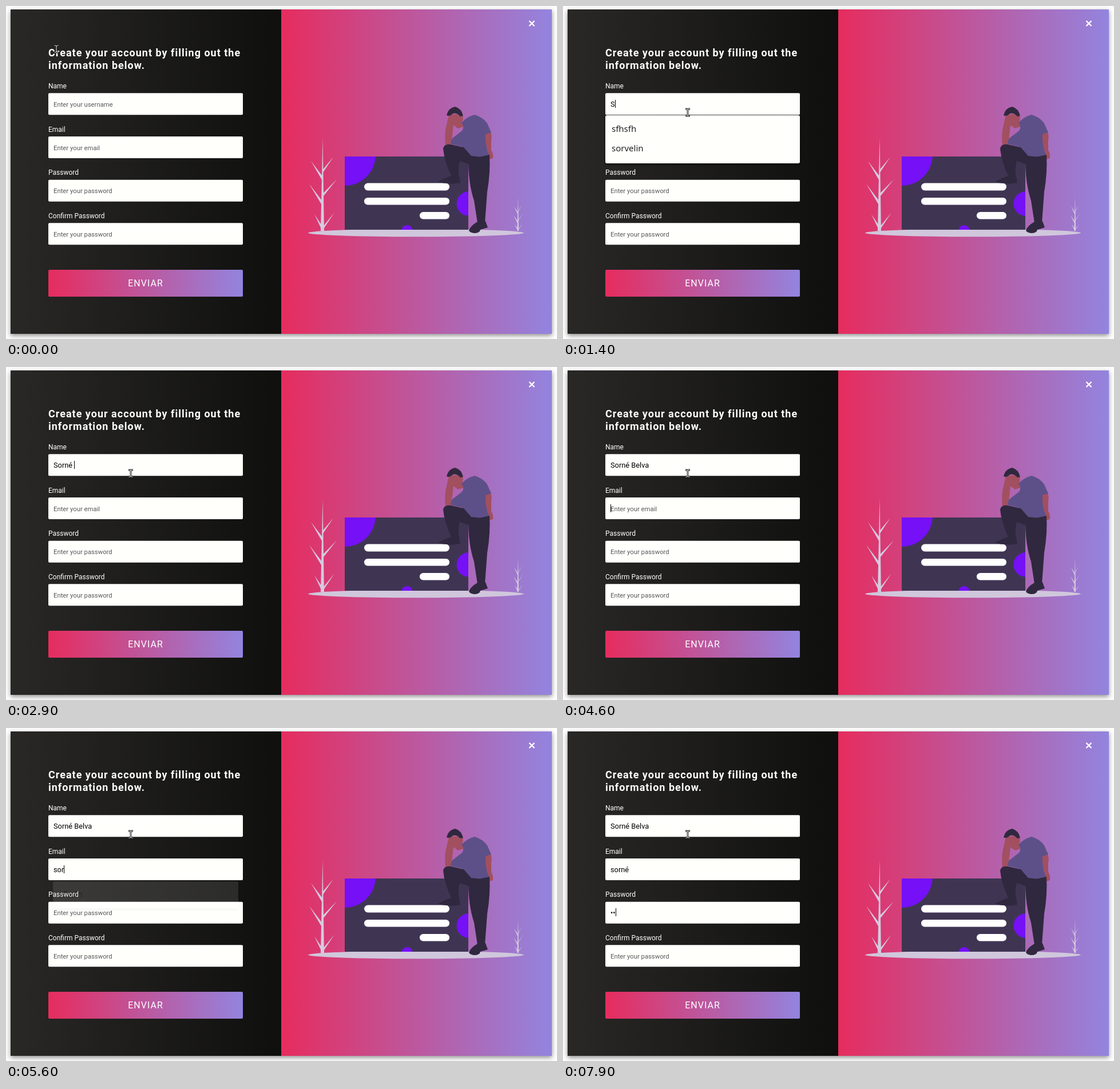
Recreate the animation shown at these times as an HTML page with a canvas. Size 963 px wide and 582 px high, loop 8000 ms.

```html
<!DOCTYPE html>
<html lang="en">
<head>
<meta charset="utf-8">
<title>Sign up</title>
<style>
  html, body { margin: 0; width: 963px; height: 582px; overflow: hidden; background: #fefefe; }
  canvas, .text, .popup, .cursor { position: absolute; }
  canvas { left: 0; top: 0; }
  .text { height: 20px; line-height: 20px; white-space: pre; font: 12px/20px Roboto, sans-serif; color: #fff; }
  .title { font-weight: 700; font-size: 18px; letter-spacing: 1px; }
  .button { font-size: 16px; letter-spacing: 1px; width: 340px; text-align: center; }
  .field { font-size: 12.8px; color: #000; }
  .field i { display: inline-block; width: 1px; height: 14px; margin-right: -1px; background: #000; vertical-align: -2px; }
  .field span { font-size: 11.3px; color: #575757; }
  .popup { left: 74px; width: 340px; padding: 8px 0; box-sizing: border-box; border-radius: 3px;
    background: #fffffc; box-shadow: 0 2px 4px rgba(0, 0, 0, .5); overflow: hidden; }
  .popup div { height: 34px; padding-left: 11px; font: 500 15px/31px "Noto Sans", "Open Sans", sans-serif; color: #222; }
  .cursor { left: 0; top: 0; overflow: visible; fill: none; }
</style>
</head>
<body>
<canvas width="963" height="582"></canvas>
<svg class="cursor" width="1" height="1">
  <g id="beam">
    <path d="M-4 -6H-1.5L0 -5L1.5 -6H4M0 -5V5M-4 6H-1.5L0 5L1.5 6H4" stroke="#111" stroke-width="2.8"/>
    <path d="M-3.5 -6H-1.5L0 -5L1.5 -6H3.5M0 -5V5M-3.5 6H-1.5L0 5L1.5 6H3.5" stroke="#fff" stroke-width="1"/>
  </g>
</svg>
<script>
const LOOP = 8000, TICK = 100;
const FIELD_X = 74, FIELD_W = 340, PITCH = 75.67;
const ctx = document.querySelector('canvas').getContext('2d');
const beam = document.getElementById('beam');

function gradient(x0, x1, from, to) {
  const g = ctx.createLinearGradient(x0, 0, x1, 0);
  g.addColorStop(0, from);
  g.addColorStop(1, to);
  return g;
}

function box(x, y, w, h, r, fill) {
  ctx.fillStyle = fill;
  ctx.beginPath();
  ctx.roundRect(x, y, w, h, r);
  ctx.fill();
}

function oval(x, y, rx, ry, fill) {
  ctx.fillStyle = fill;
  ctx.beginPath();
  ctx.ellipse(x, y, rx, ry, 0, 0, Math.PI * 2);
  ctx.fill();
}

function shape(d, fill) {
  ctx.fillStyle = fill;
  ctx.fill(new Path2D(d));
}

// Thin tapering stem with spikes, each given as tip and joint.
function plant(x, top, bottom, width, spikes) {
  const color = '#d5cbe0';
  shape(`M${x} ${top}L${x + width * .7} ${bottom}H${x - width}Z`, color);
  for (const [tipX, tipY, joinY] of spikes) {
    shape(`M${tipX} ${tipY}L${x + .5} ${joinY - width}L${x - .5} ${joinY + width}Z`, color);
  }
}

function drawCard() {
  const purple = '#7510f7';
  ctx.save();
  ctx.beginPath();
  ctx.rect(592, 263, 216, 128);
  ctx.clip();
  box(592, 263, 216, 128, 0, '#3f3553');
  oval(592, 260, 54, 54, purple);
  oval(809, 345.5, 21.5, 21.5, purple);
  oval(701, 393, 10, 10, purple);
  ctx.restore();
  box(626, 309.5, 149, 13, 6.5, '#fff');
  box(626, 335, 149, 12.5, 6.2, '#fff');
  box(723, 360, 52, 12.5, 6.2, '#fff');
}

function drawPerson() {
  const skin = '#a24f60', shirt = '#5d5088', dark = '#30283f';
  shape('M836 215L846 217Q850 226 848 236L848 252Q852 258 851 266L845 268L842 255L836 232Z', skin);
  shape('M775 190L796 188Q801 194 797 203L804 200L802 210L790 214L782 208L780 226L777 244L768 243Q766 225 769 212Q772 200 773 194Z', skin);
  shape('M796 204Q806 193 819 190Q833 194 841 205L848 221L838 224Q837 245 845 262L808 267L798 246L777 241L779 232L797 218Q802 211 796 204Z', shirt);
  shape('M808 268L845 260Q847 290 841 325L837 379L824 379L818 340Q808 310 808 268Z', dark);
  shape('M764 249Q766 240 778 242L800 247L813 262L832 264L830 276L808 276L793 271Q789 285 792 299L779 299Q766 272 764 249Z', dark);
  shape('M755 307Q763 302 778 297L792 297L794 309Q780 312 773 310Q762 310 755 307Z', dark);
  shape('M809 392Q812 384 824 377L838 376L842 387L829 391Q828 397 818 397Q810 396 809 392Z', dark);
  shape('M770 191Q773 178 785 176Q796 179 799 192L794 193Q788 186 781 188Q775 194 770 191Z', dark);
}

function drawScene() {
  ctx.save();
  ctx.shadowColor = 'rgba(0,0,0,.45)';
  ctx.shadowBlur = 8;
  ctx.shadowOffsetY = 3;
  box(8, 6, 946, 567, 0, '#222');
  ctx.restore();
  box(8, 6, 473, 567, 0, gradient(8, 481, '#292826', '#0f0f0e'));
  box(481, 6, 473, 567, 0, gradient(481, 954, '#e62c5e', '#9384df'));
  for (let i = 0; i < 4; i++) box(FIELD_X, 152.3 + i * PITCH, FIELD_W, 38, 2, '#fffffc');
  box(FIELD_X, 461, FIELD_W, 47, 2, gradient(FIELD_X, FIELD_X + FIELD_W, '#e62c5e', '#9384df'));

  ctx.strokeStyle = '#fff';
  ctx.lineWidth = 2.4;
  ctx.stroke(new Path2D('M914.5 26L923.5 35M923.5 26L914.5 35'));

  oval(716.5, 396.5, 188.5, 6.8, '#d0c7dc');
  plant(553.5, 230, 393, 3.5, [[572, 264, 289], [533, 271, 302], [578, 303, 331],
    [530, 311, 346], [574, 361, 389], [539, 364, 390]]);
  plant(895, 334, 393, 1.6, [[902, 348, 359], [888, 350, 363], [904, 362, 375],
    [887, 366, 379], [903, 381, 391], [889, 382, 391]]);
  drawCard();
  drawPerson();
}

function text(value, x, middle, kind = '') {
  const el = document.createElement('div');
  el.className = 'text ' + kind;
  el.style.left = x + 'px';
  el.style.top = middle - 10 + 'px';
  el.textContent = value;
  document.body.insertBefore(el, beam.ownerSVGElement);
  return el;
}

// Last row whose time has been reached.
const at = (rows, t) => rows.findLast(row => row[0] <= t) || rows[0];

const fields = [
  { label: 'Name', hint: 'Enter your username', value: 'Sorné Belva', focus: [500, 4600],
    typed: [[0, 0], [1400, 1], [1700, 2], [1800, 3], [2000, 4], [2500, 5], [2900, 6],
      [3200, 7], [3400, 8], [3800, 9], [3900, 10], [4200, 11]] },
  { label: 'Email', hint: 'Enter your email', value: 'sorné', focus: [4600, 6800],
    typed: [[0, 0], [5200, 1], [5400, 2], [5500, 3], [5700, 4], [6100, 5]] },
  { label: 'Password', hint: 'Enter your password', value: '••', focus: [6800, LOOP],
    typed: [[0, 0], [7800, 1], [7900, 2]] },
  { label: 'Confirm Password', hint: 'Enter your password', value: '', focus: [LOOP, LOOP], typed: [[0, 0]] },
];
const caretOff = [[1200, 1400], [7400, 7800]];
const within = ([from, to], t) => t >= from && t < to;

const lists = {
  all: ['taloesuvo604738', 'vião', 'sfhsfh', 'tkvt46', 'taloesuvo604738@vorxa.com.br', 'tkvt46@zuvq.com'],
  two: ['sfhsfh', 'sorvelin'],
  one: ['sfhsfh'],
};
// time, list, top, opacity, scale
const popupStates = [[0, 'all', 191, 0, 1], [500, 'all', 191, .5, 1], [600, 'all', 191, 1, 1],
  [1400, 'two', 191, 1, 1], [1700, 'two', 191, .5, .975], [1800, 'two', 191, .1, .953], [2000, 'two', 191, .03, .95],
  [2100, 'two', 191, 0, 1], [5200, 'one', 267, 1, 1], [5400, 'one', 267, .8, .99], [5500, 'one', 267, .4, .97],
  [5600, 'one', 267, .1, .953], [5700, 'one', 267, .03, .95], [5800, 'one', 267, 0, 1]];
const cursorPath = [[0, 88, 75], [100, 124, 105], [200, 192, 164], [300, 218, 186]];

drawScene();
text('Create your account by filling out the', FIELD_X, 82, 'title');
text('information below.', FIELD_X, 104, 'title');
text('ENVIAR', FIELD_X, 485, 'button');
fields.forEach((f, i) => {
  text(f.label, FIELD_X, 140 + i * PITCH);
  const el = text('', 83, 172 + i * PITCH, 'field');
  f.text = el.appendChild(document.createTextNode(''));
  f.caret = el.appendChild(document.createElement('i'));
  f.hintEl = el.appendChild(document.createElement('span'));
});
const popup = document.createElement('div');
popup.className = 'popup';
document.body.insertBefore(popup, beam.ownerSVGElement);
let shownList = '';

function showPopup(t) {
  const [, list, top, opacity, scale] = at(popupStates, t);
  if (list !== shownList) {
    popup.replaceChildren(...lists[list].map(item => {
      const row = document.createElement('div');
      row.textContent = item;
      return row;
    }));
    shownList = list;
  }
  popup.style.top = top + 'px';
  popup.style.opacity = opacity;
  popup.style.transform = `scale(${scale})`;
}

function render(now) {
  const t = Math.floor(now % LOOP / TICK) * TICK;
  const blinkedOff = caretOff.some(span => within(span, t));
  for (const f of fields) {
    const count = at(f.typed, t)[1];
    f.text.data = f.value.slice(0, count);
    f.hintEl.textContent = count ? '' : f.hint;
    f.caret.style.visibility = within(f.focus, t) && !blinkedOff ? 'visible' : 'hidden';
  }
  showPopup(t);
  const [, x, y] = at(cursorPath, t);
  beam.setAttribute('transform', `translate(${x} ${y})`);
}

const start = performance.now();
function frame() {
  render(performance.now() - start);
  requestAnimationFrame(frame);
}
frame();
</script>
</body>
</html>
```
